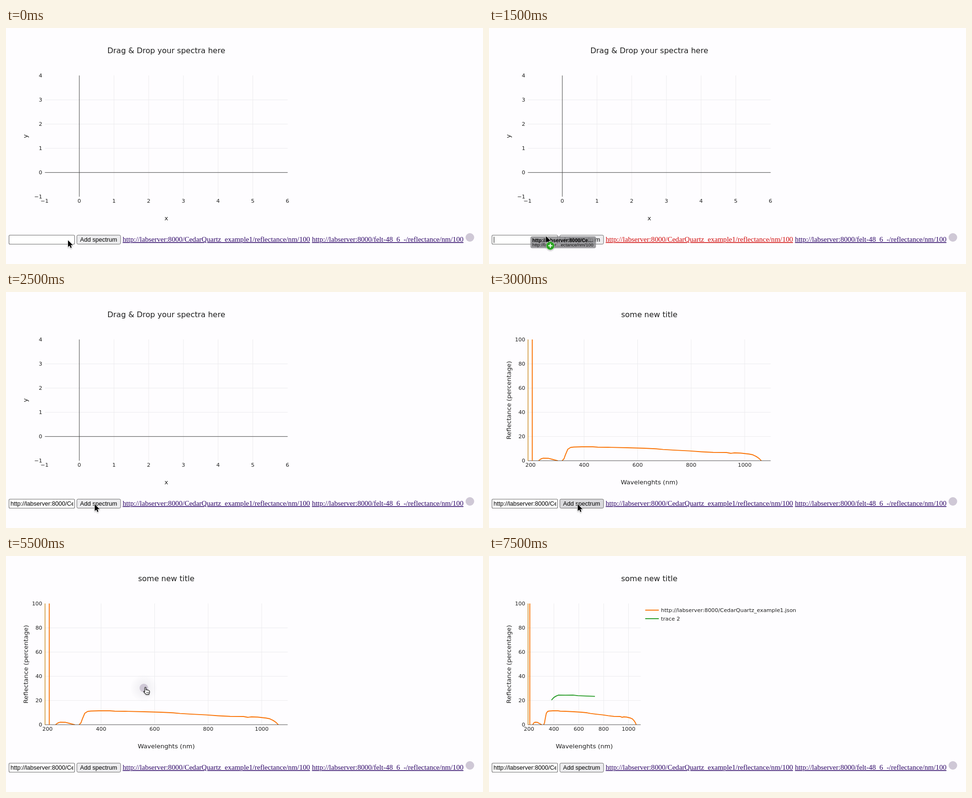
An HTML page that plays this animation: 1000 px wide and 497 px high, repeating every 8 s.

```html
<!DOCTYPE html>
<html lang="en">
<head>
<meta charset="utf-8">
<title>Spectrum plot</title>
<style>
  html, body { margin: 0; width: 100%; height: 100%; overflow: hidden; background: #fefdff; }
  svg { display: block; width: 100%; height: 100%; }
  text { white-space: pre; }
  .plot text { font: 11.3px "DejaVu Sans", sans-serif; fill: #1f1f1f; }
  .plot .axis { font-size: 13.05px; }
  .plot .title { font-size: 16px; }
  .mid { text-anchor: middle; }
  .end { text-anchor: end; }
  .link { font: 15.06px "Liberation Serif", serif; text-decoration: underline; }
  .ui { font: 12.6px "Liberation Sans", sans-serif; }
</style>
</head>
<body>
<svg viewBox="0 0 1000 497">
  <defs>
    <radialGradient id="glow">
      <stop offset="0" stop-color="#889" stop-opacity=".15"/>
      <stop offset="1" stop-color="#889" stop-opacity="0"/>
    </radialGradient>
    <filter id="shade" x="-20%" y="-40%" width="140%" height="200%">
      <feDropShadow dx="0" dy="1.5" stdDeviation="1.3" flood-opacity=".3"/>
    </filter>
    <clipPath id="field"><rect x="9" y="437" width="132" height="18"/></clipPath>
  </defs>
  <g id="plots" class="plot"></g>
  <g class="ui">
    <rect id="input" x="6.3" y="436.3" width="137.5" height="19" rx="2" fill="#fff"/>
    <text id="value" x="9.5" y="450" clip-path="url(#field)"></text>
    <path id="caret" d="M10.5 439.5V452.5" stroke="#111"/>
    <rect id="button" x="148.6" y="436.2" width="91.6" height="19" rx="2.5" stroke="#6a6a6a"/>
    <text x="155.3" y="450">Add spectrum</text>
  </g>
  <text id="link1" class="link" x="244.6" y="450"></text>
  <text id="link2" class="link" x="641.4" y="450" fill="#2c0566"></text>
  <circle cx="972.5" cy="441" r="9" fill="#cfc8d6"/>
  <g id="overlay"></g>
</svg>
<script>
const $ = id => document.getElementById(id);
const STEP = 500, LOOP = 8000;
const HOST = 'http://labserver:8000/';
const FIRST = HOST + 'CedarQuartz_example1/reflectance/nm/100';
const SECOND = HOST + 'felt-48_6_-/reflectance/nm/100';
const TOP = 100, BOTTOM = 355.3, LEFT = 81.5;
const GRID = '#ececee', ORANGE = '#fa7305', GREEN = '#249a24';

const text = (x, y, s, cls = '') => `<text x="${x}" y="${y}" class="${cls}">${s}</text>`;
const line = (x1, y1, x2, y2, color, width = 1) =>
  `<path d="M${x1} ${y1}L${x2} ${y2}" stroke="${color}" stroke-width="${width}"/>`;
const polyline = (points, color) =>
  `<polyline points="${points.join(' ')}" fill="none" stroke="${color}" stroke-width="1.9" stroke-linejoin="round"/>`;

// Smooth reflectance samples as [nm, percent]
const BUMP = [[230, 0], [239, 1.5], [248, 2.1], [266, 2], [284, 1], [302, 0]];
const SPECTRUM = [[318, 0], [325, 1.6], [330, 4.7], [339, 9.4], [350, 11], [362, 11.3], [392, 11.5],
  [433, 11.5], [451, 11.2], [490, 11.1], [562, 10.7], [624, 10.3], [669, 9.8], [695, 9.3], [740, 8.7],
  [793, 8.1], [838, 7.4], [882, 6.9], [932, 6.8], [948, 6.1], [962, 6.5], [985, 6.3], [1016, 5.5],
  [1030, 4.9], [1043, 3.5], [1053, 2], [1062, 0]];
const TRACE = [[381, 20.4], [400, 22.5], [419, 23.7], [438, 24.5], [492, 24.4], [553, 24.5], [592, 24], [730, 23.4]];

function labels(title, xTitle, yTitle, center, yBase) {
  return text(336, 53, title, 'title mid') + text(center, 404.5, xTitle, 'axis mid') +
    `<text class="axis mid" transform="translate(${yBase} 228) rotate(-90)">${yTitle}</text>`;
}

function emptyPlot() {
  let out = '';
  const xAt = v => 153.7 + v * 72.75, yAt = v => 304.3 - v * 51;
  for (let v = -1; v <= 6; v++) {
    const name = v < 0 ? '−1' : v;
    if (v > 0 && v < 6) out += line(xAt(v), TOP, xAt(v), BOTTOM, GRID);
    out += text(xAt(v), 367.7, name, 'mid');
    if (v > 4) continue;
    if (v > 0 && v < 4) out += line(LEFT, yAt(v), 590.5, yAt(v), GRID);
    out += text(76, yAt(v) + 4, name, 'end');
  }
  return out + line(LEFT, yAt(0), 590.5, yAt(0), '#444') + line(xAt(0), TOP, xAt(0), BOTTOM, '#444') +
    labels('Drag &amp; Drop your spectra here', 'x', 'y', 336, 45);
}

function spectrumPlot(x400, scale, right, traces) {
  const at = ([nm, v]) => [x400 + (nm - 400) * scale, BOTTOM - v * 2.55];
  let out = '';
  for (let nm = 200; nm <= 1000; nm += 200) {
    const x = at([nm, 0])[0];
    if (nm > 200) out += line(x, TOP, x, BOTTOM, GRID);
    out += text(x, 367.7, nm, 'mid');
  }
  for (let v = 0; v <= 100; v += 20) {
    const y = at([0, v])[1];
    if (v > 0 && v < 100) out += line(LEFT, y, right, y, GRID);
    out += text(76, y + 4, v, 'end');
  }
  const spike = at([206.5, 0])[0];
  out += polyline(BUMP.map(at), ORANGE) + polyline(SPECTRUM.map(at), ORANGE) +
    line(LEFT, BOTTOM, right, BOTTOM, '#555') +
    line(LEFT + .3, TOP, LEFT + .3, BOTTOM, '#c98a22', 1.4) +
    line(spike, TOP, spike, BOTTOM, ORANGE, 1.9);
  if (traces > 1) {
    out += polyline(TRACE.map(at), GREEN) +
      line(327.5, 114, 356, 114, ORANGE, 1.9) + text(360.5, 118.2, HOST + 'CedarQuartz_example1.json') +
      line(327.5, 132, 356, 132, GREEN, 1.9) + text(360.5, 136.2, 'trace 2');
  }
  return out + labels('some new title', 'Wavelenghts (nm)', 'Reflectance (percentage)', (81.5 + right) / 2, 46);
}

const cursor = (d, x, y, paint, extra = '') =>
  `<g transform="translate(${x} ${y})" filter="url(#shade)"><path d="${d}" ${paint} stroke-linejoin="round"/>${extra}</g>`;
const arrow = (x, y) => cursor('M0 0V14.2L3.3 11.2L5.5 16.3L7.8 15.3L5.6 10.3H10.2Z', x, y,
  'stroke="#fff" stroke-width="1.4" paint-order="stroke"');
const hand = (x, y) => cursor(
  'M1.5 10V1.6Q1.5.3 2.7.3T4 1.6V6Q5.8 5.2 6.6 6.4Q8.2 5.6 9 7Q11.3 6.6 11.3 9V11.5L10 15.5H4.2L-1 9.6Q-.6 7.8 1.5 10Z',
  x, y, 'fill="#fff" stroke="#111" stroke-width="1.1"',
  '<path d="M5.4 10V13.3M7.3 10V13.3M9.2 10V13.3" stroke="#111" stroke-width=".7"/>');
const cross = (x, y) => `<path d="M${x - 8} ${y}h16M${x} ${y - 8}v16" stroke="#222"/>`;

const badge = (x, y) => `<g transform="translate(${x} ${y})" filter="url(#shade)">
  <circle r="8.8" fill="#2ca321" stroke="#fff" stroke-opacity=".7" stroke-width=".8"/>
  <path d="M-4.5 0H4.5M0-4.5V4.5" stroke="#fff" stroke-width="2"/></g>`;
const copyArrow = (x, y) => arrow(x, y) + badge(x + 9.3, y + 20.3);

const ghost = (x, y, opacity) => `<circle cx="${x}" cy="${y}" r="29" fill="url(#glow)"/>
  <circle cx="${x}" cy="${y}" r="9" fill="#cfc8d6" opacity="${opacity}"/>`;
const linkGhost = (x, y) => `<g transform="translate(${x} ${y})" font-family="Liberation Sans, sans-serif">
  <rect width="137.5" height="25" rx="4" fill="#868689" opacity=".8"/>
  <text x="4" y="12.3" font-size="10.3" font-weight="bold">${HOST}Ce…</text>
  <text x="4" y="21.3" font-size="9.6" fill="#111">http://labser…ectance/nm/100</text></g>`;

// Pointer scene for each half second
const SCENES = [
  arrow(130, 447),
  hand(370, 446),
  hand(370, 444),
  linkGhost(86.8, 438.8) + copyArrow(119.3, 438.3),
  arrow(120, 440),
  arrow(186, 447),
  arrow(186, 447),
  cross(384.5, 347.5),
  hand(970, 439),
  ghost(925, 428, .5) + copyArrow(883, 401),
  ghost(289, 278, .6) + copyArrow(284, 272),
  ghost(289, 278, 1) + hand(289.5, 276),
  hand(289.5, 276),
  hand(289.5, 276),
  '', ''
];
const PLOTS = [emptyPlot(), spectrumPlot(199.3, .5613, 590.5, 1), spectrumPlot(136, .2609, 318, 2)];

$('link1').textContent = FIRST;
$('link2').textContent = SECOND;
$('value').textContent = FIRST;
$('plots').innerHTML = PLOTS.map(p => `<g>${p}</g>`).join('');

const show = (el, on) => el.setAttribute('visibility', on ? 'visible' : 'hidden');
let shown = -1;

function render(time) {
  const step = Math.floor(time % LOOP / STEP);
  if (step === shown) return;
  shown = step;
  const plot = step < 6 ? 0 : step < 12 ? 1 : 2;
  [...$('plots').children].forEach((el, i) => show(el, i === plot));
  show($('value'), step >= 4);
  show($('caret'), step === 3);
  $('input').setAttribute('stroke', step === 4 ? '#101010' : '#6a6a6a');
  $('input').setAttribute('stroke-width', step === 4 ? 2 : 1.1);
  $('button').setAttribute('fill', step === 6 ? '#dadadd' : '#ededef');
  $('link1').setAttribute('fill', step === 2 || step === 3 ? '#d00808' : '#2c0566');
  $('overlay').innerHTML = SCENES[step];
}

const start = performance.now();
function tick() {
  render(performance.now() - start);
  requestAnimationFrame(tick);
}
tick();
</script>
</body>
</html>
```
